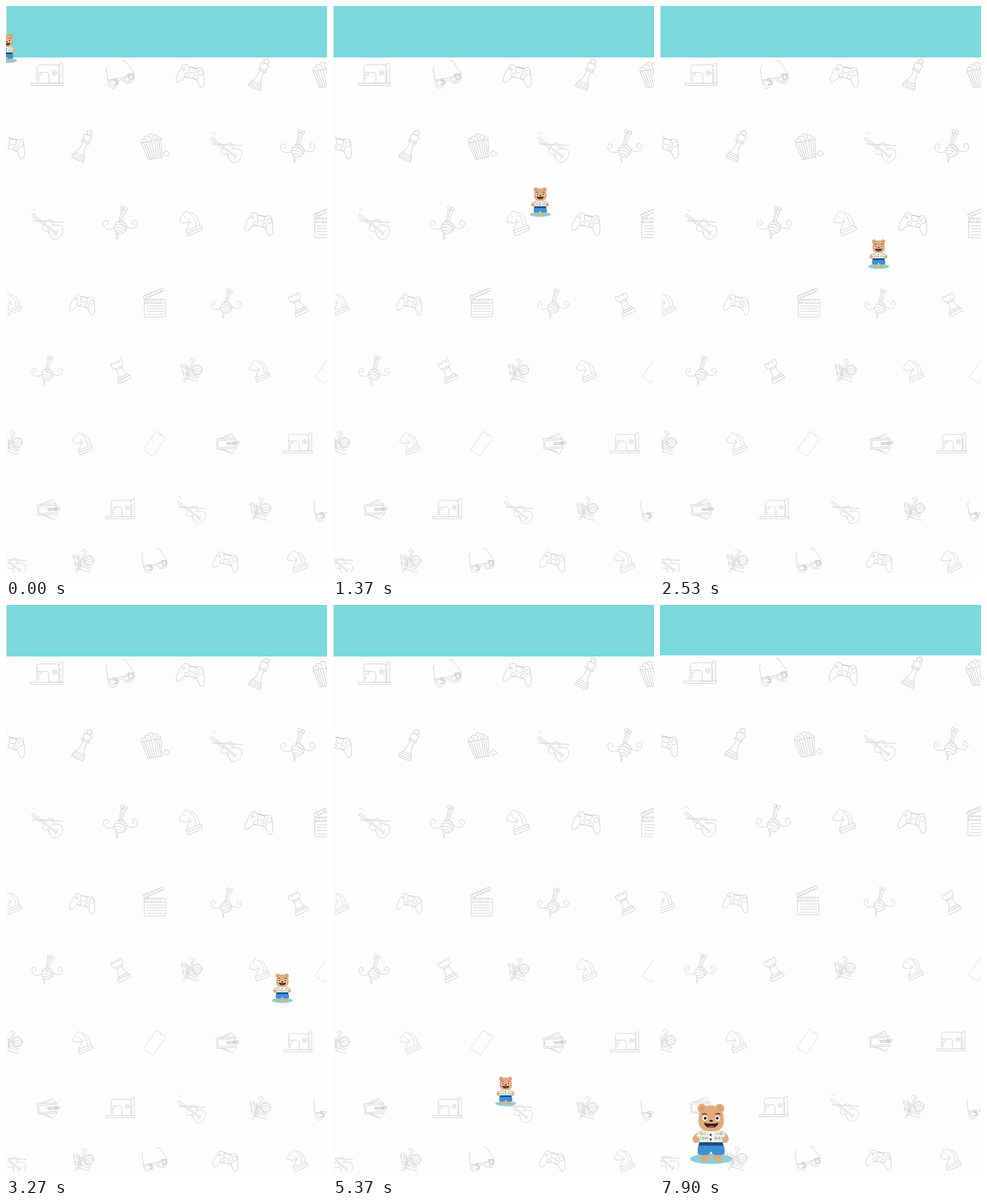
Recreate the animation shown at these times as an HTML page. Size 561x998 px, loop 8000 ms.

```html
<!DOCTYPE html>
<html lang="en">
<head>
<meta charset="utf-8">
<title>Bear walk</title>
<style>
  html, body { margin: 0; width: 100%; height: 100%; overflow: hidden; background: #fdfdfd; }
  svg { display: block; width: 100%; height: 100%; }
  .icon { fill: none; stroke: #cbcbd0; stroke-width: .95; stroke-linejoin: round; stroke-linecap: round; }
  .icon .solid { fill: #cdcdd1; stroke: none; }
  .icon .paper { fill: #fdfdfd; }
  .icon text { fill: #c4c4cc; stroke: none; font: 700 8px Lato, sans-serif; text-anchor: middle; }
  .skin { fill: #e2aa7e; }
  .ink { fill: #33211d; }
</style>
</head>
<body>
<svg viewBox="0 0 561 998">
  <defs>
    <clipPath id="page"><rect x="3" y="0" width="570" height="991"/></clipPath>

    <g id="sewing">
      <path d="M-28 14H28V18H-28ZM-18 12V-13Q-18 -18 -13 -18H20V14H3V-1Q3 -5 -3 -5H-10V-1H-15V10M-18 -5H-10M20 -16H22V-21H27V14H22V-10"/>
      <circle cx="13" cy="-4" r="4"/><circle cx="13" cy="-4" r="1.5"/>
    </g>
    <g id="glasses">
      <path d="M-22 8L-25 -12L-22 -17M24 -3L8 -26L4 -25M-22 8Q-3 8 23 -3Q26 8 20 13Q8 17 3 8Q0 6 -3 10Q-4 20 -13 23Q-21 22 -22 8Z"/>
      <path d="M-19 10L-5 9Q-6 17 -12 19Q-18 18 -19 10ZM5 6L21 0Q22 8 17 11Q8 12 5 6Z"/>
      <text x="-12" y="17" transform="rotate(-15 -12 14)">3</text><text x="13" y="9" transform="rotate(-15 13 6)">D</text>
    </g>
    <g id="pad" transform="rotate(12)">
      <path d="M-17 -15Q-11 -18 -8 -14H8Q11 -18 17 -15Q22 -6 25 10Q24 20 18 16L10 5H-10L-18 16Q-24 20 -25 10Q-22 -6 -17 -15ZM-7 -13H7L5 -4H-5Z"/>
      <circle cx="-8" cy="2" r="4"/><circle cx="8" cy="2" r="4"/>
      <path d="M-15 -11V-4M-18.500 -7.500H-11.500"/>
      <circle cx="15" cy="-7.500" r="4.500"/>
    </g>
    <g id="king" transform="rotate(25)">
      <path d="M-2 -22V-24H-5V-28H-2V-31H2V-28H5V-24H2V-22M-5 -11L-8 -20Q0 -25 8 -20L5 -11ZM-7 -11H7V-8H-7ZM-4 -8Q-3 6 -8 14H8Q3 6 4 -8M-9 14H9V18H-9ZM-11 18H11V25H-11ZM-11 22H11"/>
    </g>
    <g id="popcorn" transform="rotate(-10)">
      <path d="M-22 -11L-15 20H9L13 -11ZM-18 -11L-12 20M-14 -11L-9 20M-9 -11L-6 20M-4 -11L-3 20M1 -11L1 20M5 -11L4 20M9 -11L7 20"/>
      <path d="M-21 -11Q-23 -17 -16 -17Q-15 -23 -9 -20Q-4 -27 1 -21Q8 -21 8 -16Q14 -15 13 -11M-16 -17Q-10 -16 -12 -11M-9 -20Q-2 -18 -5 -12M1 -21Q-2 -15 3 -11M8 -16Q3 -15 6 -11M14 17Q11 13 16 12Q20 8 22 14Q25 18 20 19Q16 21 14 17Z"/>
    </g>
    <g id="violin" opacity=".75">
      <path d="M-25 -6L28 -2L-25 -4M-26 -24Q-20 -27 -20 -21"/>
      <g transform="rotate(38) scale(1 1.25)"><path d="M-30 2H-2V5H-30ZM-3 -4Q3 -12 9 -4Q15 -7 22 -9Q31 -8 32 2Q31 12 23 12Q15 11 9 7Q2 15 -3 8ZM0 2H25M0 4H25M23 -2V8M8 -1L14 -4M8 6L14 9"/></g>
    </g>
    <g id="yarn">
      <circle cy="7" r="11"/>
      <path d="M-9 2Q3 0 10 7M-11 7Q1 4 7 14M-9 13Q0 10 4 17M-5 -3Q6 1 9 13M2 -4L11 4M-3 -3L2 -25M0 -4L5 -25M3 -4L9 -23M-8 15L-6 28L-4 17"/>
      <circle cx="3" cy="-27" r="3"/><circle cx="9" cy="-25" r="3"/>
      <path d="M-11 9Q-29 14 -30 1Q-29 -8 -22 -4Q-19 2 -25 2M11 6Q27 14 30 1Q28 -8 22 -5Q18 1 25 3"/>
    </g>
    <g id="knight">
      <path d="M-9 13L17 3L20 11L-6 22ZM-7 17L18 7M-8 12Q-7 3 -1 -3Q-8 0 -14 -1L-20 -3V-8L-13 -18L-9 -22L-6 -19Q13 -19 14 4M-2 -16Q8 -10 8 5M-12 -12L-10 -11M-6 -8Q-2 -6 -1 -3"/>
    </g>
    <g id="clapper">
      <path d="M-20 -9H21V25H-20ZM-20 -2H21M-16 4H17M-16 9H17M-16 14H17M-16 20H17"/>
      <path class="solid" d="M-20 -2L-16 -9H-10L-14 -2ZM-8 -2L-4 -9H2L-2 -2ZM4 -2L8 -9H14L10 -2Z"/>
      <g transform="rotate(-23 -20 -10)"><path d="M-20 -16H21V-10H-20Z"/><path class="solid" d="M-17 -16H-11L-7 -10H-13ZM-5 -16H1L5 -10H-1ZM7 -16H13L17 -10H11Z"/></g>
    </g>
    <g id="rook" transform="rotate(-26)">
      <path d="M-11 -20H-6V-17H-3V-20H3V-17H6V-20H11V-11L7 -8H-7L-11 -11ZM-6 -8Q-5 4 -9 11H9Q5 4 6 -8M-11 11H11V15H-11ZM-13 15H13V21H-13ZM-7 -5H7"/>
    </g>
    <g id="craft">
      <circle cx="11" cy="-2" r="10"/><circle cx="11" cy="-2" r="8"/>
      <path d="M11 2L7 -2Q7 -6 11 -4Q15 -7 15 -2ZM-21 -10L8 6M-19 -13L7 0M-16 1L14 12M-18 4L12 15M-16 20L4 -22M-13 21L7 -21M-12 -15L-8 15M-8 -12L-4 16M4 -22Q-3 -27 -3 -19M-19 -12L-15 10M-12 14L14 21"/>
    </g>
    <g id="phone" transform="rotate(35)" opacity=".75"><rect x="-11.500" y="-22" width="23" height="44" rx="2.500"/><path d="M-3 -20H3"/></g>
    <g id="ticket">
      <path d="M-14 -10L10 -20L13 -15L16 -9M-12 10L12 20L15 15L19 9M-10 -9L8 -16M-6 11L9 16"/>
      <g transform="rotate(-4)"><path class="paper" d="M-19 -10H19V-4Q16 0 19 4V10H-19V4Q-16 0 -19 -4Z"/><path d="M-16 -7H16V7H-16Z"/><text y="2.500" style="font-size:7px">TICKET</text></g>
    </g>
  </defs>

  <g id="scene">
    <path fill="#79d9dc" d="M1 -4H566V90H1Z"/>
    <g id="icons" clip-path="url(#page)"></g>
    <g id="bear">
      <ellipse rx="37" ry="9" fill="#8fced2"/>
      <g id="body">
        <path class="skin" d="M-20 -13H-2L-4 0Q-6 5 -14 4Q-20 3 -18 -4ZM2 -13H20L18 -4Q20 3 14 4Q6 5 4 0ZM-20 -48Q-31 -43 -33 -35Q-31 -26 -24 -28Q-19 -32 -18 -40ZM20 -48Q29 -43 31 -35Q29 -26 22 -28Q18 -32 17 -40Z"/>
        <path fill="#3a92d2" d="M-21 -28H20Q25 -17 23 -8Q12 -5 3 -8L0 -13L-4 -8Q-14 -5 -23 -8Q-25 -17 -21 -28Z"/>
        <path fill="#e6f0dd" stroke="#93cfcc" d="M-14 -50H14Q25 -47 25 -40L20 -36V-28H-21V-36L-26 -40Q-25 -47 -14 -50Z"/>
        <g id="flowers" fill="none"></g>
        <path fill="#fdfdfd" d="M-4 -50H4V-28H-4Z"/>
        <g fill="#1d4d8c"><path d="M-21 -29H20L21 -23H-22Z"/><circle cx="-1" cy="-42" r="2"/><circle cx="-1" cy="-34" r="2"/></g>
        <g class="skin">
          <circle cx="-16" cy="-88" r="8"/><circle cx="15" cy="-88" r="8"/>
          <path d="M0 -93Q20 -93 22 -71Q25 -48 0 -48Q-25 -48 -22 -71Q-20 -93 0 -93Z"/>
        </g>
        <g fill="#d9996f"><circle cx="-16" cy="-88" r="4"/><circle cx="15" cy="-88" r="4"/></g>
        <g fill="#fff"><circle cx="-11" cy="-71" r="4.500"/><circle cx="11" cy="-71" r="4.500"/></g>
        <g class="ink">
          <circle cx="-10.500" cy="-71" r="2.500"/><circle cx="10.500" cy="-71" r="2.500"/><ellipse cy="-66.500" rx="3" ry="1.800"/>
          <path d="M-13 -63Q0 -60 13 -63Q10 -54 0 -54Q-10 -54 -13 -63Z"/>
        </g>
        <path d="M-16 -78Q-12 -80 -8 -78M8 -78Q12 -80 16 -78" fill="none" stroke="#33211d" stroke-width="1.500"/>
        <ellipse cy="-56" rx="5" ry="1.600" fill="#e0524e"/>
      </g>
    </g>
  </g>
</svg>
<script>
const LOOP = 8000;
const $ = id => document.getElementById(id);

// Wallpaper: one running sequence. Each row shows five icons and the next row
// starts two or three icons further on, so the motif drifts down to the left.
const sequence = ("sewing glasses pad king popcorn violin yarn knight pad clapper yarn rook " +
  "craft knight phone ticket sewing violin craft glasses pad knight").split(" ");
const rowY = [121, 246, 380, 521, 638, 765, 880, 971];

function wallpaper() {
  let html = "", start = 0;
  rowY.forEach((y, row) => {
    const odd = row % 2, scale = row < 3 ? 1 : .9;
    for (let i = 0; i < 5; i++) {
      const x = odd ? 10 + 125 * i : 72 + 130 * i - 2 * i * i;
      html += `<use href="#${sequence[start + i]}" class="icon" transform="translate(${x} ${y}) scale(${scale})"/>`;
    }
    start += 2 + odd;
  });
  return html;
}
$("icons").innerHTML = wallpaper();

const petals = ["#d9665c", "#e3bd5a", "#4f9fc6"];
$("flowers").innerHTML = Array.from({ length: 10 }, (_, i) => {
  const side = i % 2 ? 1 : -1, n = i >> 1;
  return `<circle cx="${side * (8 + n * 3)}" cy="${-36 - n % 2 * 8}" r="1.800" stroke="${petals[n % 3]}"/>`;
}).join("");

// Turning points of the walk: time, x, y.
const walk = [
  [0, 1, 75], [840, 166, 309], [1370, 362, 344], [1670, 422, 429],
  [2100, 345, 500], [2530, 382, 435], [3270, 483, 671], [3700, 385, 700],
  [4430, 123, 734], [4620, 155, 790], [5000, 281, 722], [5370, 302, 851],
  [5830, 180, 959], [6400, 91, 950]
];

const clamp01 = v => Math.min(1, Math.max(0, v));
const progress = (t, from, to) => clamp01((t - from) / (to - from));
const smooth = p => p * p * (3 - 2 * p);

function slope(i, axis) {
  if (i === walk.length - 1) return 0;
  const a = walk[Math.max(0, i - 1)], b = walk[i + 1];
  return (b[axis] - a[axis]) / (b[0] - a[0]);
}

// Cubic Hermite curve through the turning points.
function position(t, axis) {
  let i = 0;
  while (i < walk.length - 2 && t > walk[i + 1][0]) i++;
  const a = walk[i], b = walk[i + 1], span = b[0] - a[0];
  const u = progress(t, a[0], b[0]), v = 1 - u;
  return a[axis] * v * v * (1 + 2 * u) + b[axis] * u * u * (3 - 2 * u)
    + span * u * v * (slope(i, axis) * v - slope(i + 1, axis) * u);
}

function render(t) {
  const grow = smooth(progress(t, 5850, 6400));
  const shift = progress(t, 6740, 6930);
  const hop = Math.sin(Math.PI * progress(t, 7550, 7900));
  $("scene").setAttribute("transform", `translate(${-1.5 * shift} ${-2 * shift})`);
  $("bear").setAttribute("transform",
    `translate(${position(t, 1)} ${position(t, 2) + 20}) scale(${.49 + .51 * grow})`);
  $("body").setAttribute("transform", `scale(1 ${1 + .03 * hop})`);
}

function tick() {
  render(performance.now() % LOOP);
  requestAnimationFrame(tick);
}
tick();
</script>
</body>
</html>
```
